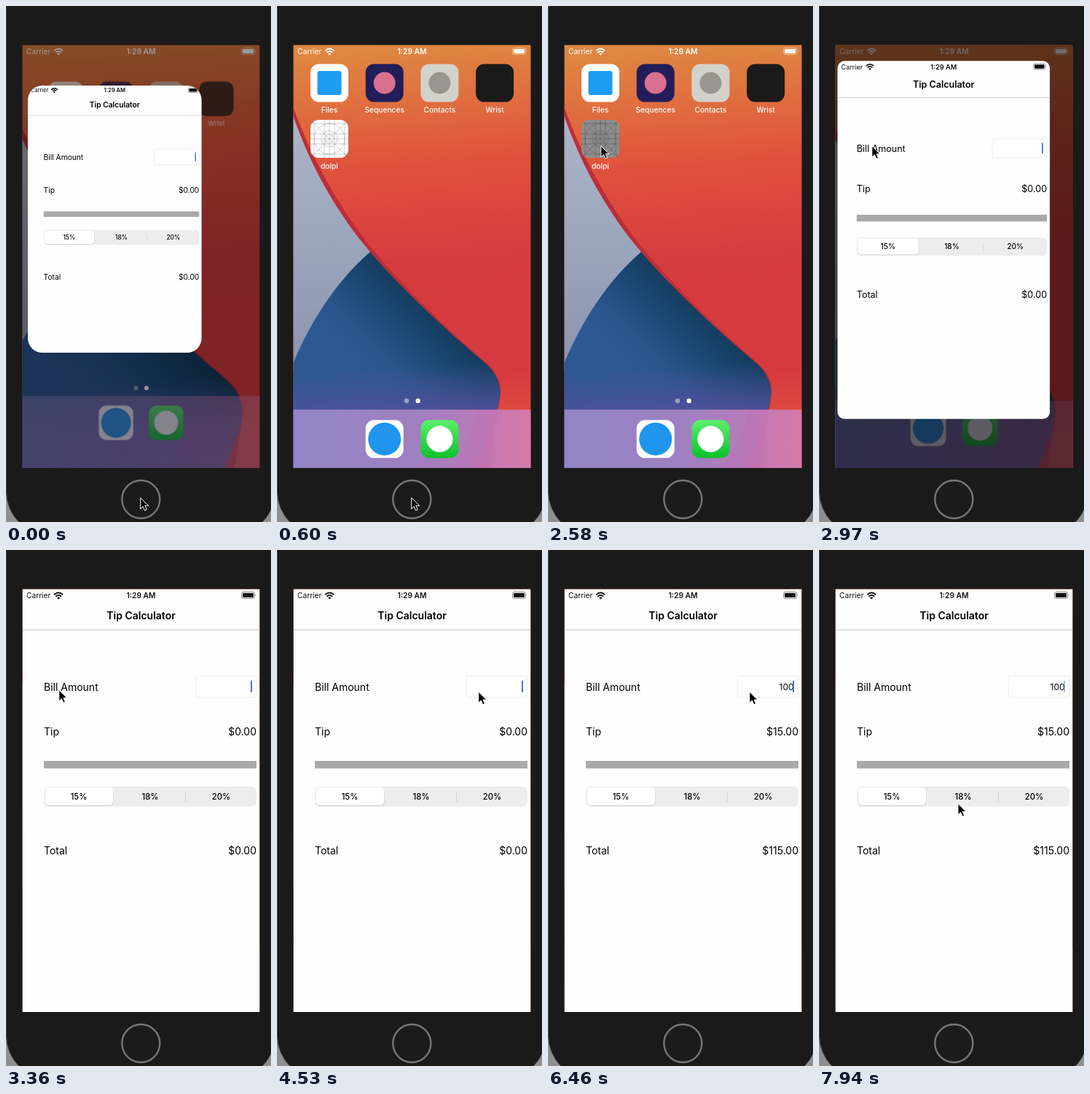
An HTML page for the animation above (8 s loop, 364 by 707 pixels).

```html
<!DOCTYPE html>
<html lang="en">
<head>
<meta charset="utf-8">
<title>Tip calculator demo</title>
<style>
  html, body { margin: 0; width: 100%; height: 100%; overflow: hidden; background: #8f8f8f; }
  svg { display: block; width: 100vw; height: 100vh; }
  text { font-family: Inter, Roboto, sans-serif; font-size: 14px; }
  .mid { text-anchor: middle; }
  .end { text-anchor: end; }
  .label { font-size: 10.2px; font-weight: 500; fill: #fff; text-anchor: middle; }
  .status { font-size: 10.2px; }
  .time { font-size: 10.3px; font-weight: 600; text-anchor: middle; }
  .segment { font-size: 11.3px; font-weight: 500; text-anchor: middle; }
</style>
</head>
<body>
<svg viewBox="0 0 364 707">
  <defs>
    <clipPath id="screenClip"><rect x="22.5" y="53.5" width="326" height="579.5"/></clipPath>
    <clipPath id="cardClip"><rect id="cardShape" x="22.5" y="53.5" width="326" height="579.5"/></clipPath>
    <linearGradient id="red" gradientUnits="userSpaceOnUse" x1="165" y1="53" x2="200" y2="560">
      <stop offset="0" stop-color="#de8842"/><stop offset=".14" stop-color="#e0713f"/>
      <stop offset=".32" stop-color="#e0523c"/><stop offset=".58" stop-color="#d63b40"/>
      <stop offset=".9" stop-color="#d63a40"/><stop offset="1" stop-color="#dc493e"/>
    </linearGradient>
    <linearGradient id="mist" x2="0" y2="1">
      <stop offset="0" stop-color="#abb6c8"/><stop offset="1" stop-color="#8b94b0"/>
    </linearGradient>
    <linearGradient id="blue" gradientUnits="userSpaceOnUse" x1="225" y1="425" x2="130" y2="520">
      <stop offset="0" stop-color="#143b5b"/><stop offset=".35" stop-color="#1a4874"/>
      <stop offset=".7" stop-color="#2a548c"/><stop offset="1" stop-color="#2e5891"/>
    </linearGradient>
    <linearGradient id="dusk" gradientUnits="userSpaceOnUse" x1="160" y1="495" x2="164" y2="560">
      <stop offset="0" stop-color="#54509c" stop-opacity="0"/><stop offset="1" stop-color="#54509c" stop-opacity=".85"/>
    </linearGradient>
    <linearGradient id="dockTint">
      <stop offset="0" stop-color="#938bcb"/><stop offset=".5" stop-color="#a583c4"/>
      <stop offset=".8" stop-color="#c97db8"/><stop offset="1" stop-color="#e57ca6"/>
    </linearGradient>
    <linearGradient id="green" x2="0" y2="1">
      <stop offset="0" stop-color="#5df06c"/><stop offset="1" stop-color="#0cc02c"/>
    </linearGradient>
    <path id="wave" d="M22 490C45 434 82 376 128 337C173 390 240 451 288 491Q306 508 306.500 530Q306 546 298 562L270 640H22Z"/>
    <g id="statusBar">
      <text class="status" x="28" y="66">Carrier</text>
      <path d="M66.2 61.2Q72.2 55.8 78.2 61.2M68.3 63.7Q72.2 60.2 76.1 63.7" fill="none" stroke="currentColor" stroke-width="1.9"/>
      <path d="M70 65.4Q72.2 63.6 74.4 65.4L72.2 67.6Z"/>
      <text class="time" x="185.5" y="66">1:29 AM</text>
      <rect x="323.5" y="57.5" width="18" height="9" rx="2.4" fill="none" stroke="currentColor" stroke-width=".8" opacity=".6"/>
      <rect x="325" y="59" width="15" height="6" rx="1.2"/>
      <path d="M342.6 60.5q1.4 1.5 0 3z" opacity=".6"/>
    </g>
  </defs>

  <rect x=".5" y="-99.5" width="369" height="824.5" rx="60" fill="#1a1a1a" stroke="#3c3c3c"/>
  <circle cx="185.3" cy="676" r="26" fill="#1b1b1b" stroke="#767676" stroke-width="2.4"/>

  <g clip-path="url(#screenClip)">
    <g id="wallpaper">
      <rect x="22" y="53" width="328" height="581" fill="url(#red)"/>
      <path fill="#bd2d38" d="M22 138C48 210 88 281 131 333C178 390 242 450 290 491Q308 508 307.500 530L290 640H22Z"/>
      <path fill="url(#mist)" d="M22 150C46 220 84 286 128 337V500H22Z"/>
      <use href="#wave" fill="url(#blue)"/>
      <use href="#wave" fill="url(#dusk)"/>
    </g>
    <g id="springboard">
      <g id="dock">
        <rect x="-20" y="553" width="410" height="130" fill="url(#dockTint)"/>
        <path d="M232 640Q262 606 276 553H305Q290 604 300 640Z" fill="#c46cb5" opacity=".25"/>
      </g>
      <g id="icons"></g>
      <circle cx="178" cy="541" r="3.2" fill="#fff" opacity=".45"/>
      <circle cx="193.7" cy="541" r="3.2" fill="#fff"/>
    </g>
    <use href="#statusBar" fill="#fff" color="#fff"/>
    <rect id="dim" x="22" y="53" width="328" height="581"/>

    <g id="card"><g clip-path="url(#cardClip)">
      <rect x="22" y="53" width="328" height="581" fill="#fefefe"/>
      <path d="M22 109.5H350" stroke="#c9c9c9"/>
      <use href="#statusBar" fill="#111" color="#111"/>
      <text class="mid" x="185.5" y="95" font-weight="600">Tip Calculator</text>
      <text x="52" y="193">Bill Amount</text>
      <rect x="260.2" y="172.5" width="83.5" height="29.5" rx="4" fill="#fff" stroke="#e9e9e9" stroke-width=".9"/>
      <text id="bill" class="end" x="337.6" y="192" style="font-size:12px"></text>
      <rect id="caret" x="336.2" y="179" width="1.8" height="16" fill="#3f62d8"/>
      <text x="52" y="254">Tip</text>
      <text id="tip" class="end" x="344" y="254"></text>
      <rect x="52" y="289" width="292" height="10.3" fill="#a9a9a9"/>
      <rect x="52" y="324" width="292" height="27.5" rx="6.5" fill="#ededee"/>
      <rect x="53.5" y="326" width="94" height="25" rx="5.5" fill="#d2d2d2"/>
      <rect x="53.5" y="325.2" width="93.5" height="24.6" rx="5.5" fill="#fff"/>
      <path d="M246.5 331V345" stroke="#d4d4d6"/>
      <text class="segment" x="100" y="342" font-weight="600">15%</text>
      <text class="segment" x="198" y="342">18%</text>
      <text class="segment" x="295.5" y="342">20%</text>
      <text x="52" y="417">Total</text>
      <text id="total" class="end" x="344" y="417"></text>
    </g></g>
  </g>
  <path id="cursor" d="M0 0V15.2L3.5 11.900L6 17.500L8.600 16.300L6.200 10.900H11Z" fill="#000" stroke="#fff"/>
</svg>
<script>
const $ = id => document.getElementById(id);
const LOOP = 8000;
const STEP = 147;
const CARD_CLOSED = 600;
const ICON_PRESSED = 2580;
const CARD_OPENING = 2970;
const KEY_PRESSES = [5430, 6320, 6460];

// Home screen icons: a tile with one plain shape on it.
const tile = (column, y, fill, shape = '', name = '') =>
  `<g transform="translate(${46 + 75.7 * column} ${y})"><rect width="52" height="52" rx="11.5" fill="${fill}"/>
   ${shape}<text class="label" x="26" y="66.5">${name}</text></g>`;
const disc = (r, fill) => `<circle cx="26" cy="26" r="${r}" fill="${fill}"/>`;
const square = (size, fill) =>
  `<rect x="${26 - size / 2}" y="${26 - size / 2}" width="${size}" height="${size}" rx="3" fill="${fill}"/>`;
const guides = `<g fill="none" stroke="#aaa" stroke-width=".6">
  ${[6, 11, 21].map(r => `<circle cx="26" cy="26" r="${r}"/>`).join('')}
  ${[5, 19, 26, 33, 47].map(p => `<path d="M${p} 0V52M0 ${p}H52"/>`).join('')}
  <path d="M3 3L49 49M49 3L3 49"/></g>
  <rect id="press" width="52" height="52" rx="11.5" opacity=".45"/>`;

$('icons').innerHTML =
  tile(0, 79.5, '#fff', square(33, '#1c9cf2'), 'Files') +
  tile(1, 79.5, '#221d58', disc(15, '#d9708f'), 'Sequences') +
  tile(2, 79.5, '#d3d2ca', disc(15, '#98968e'), 'Contacts') +
  tile(3, 79.5, '#1b1a1b', '', 'Wrist') +
  tile(0, 156, '#fff', guides, 'dolpi') +
  tile(1, 567.3, '#fff', disc(22.5, '#1f95ee')) +
  tile(2, 567.3, 'url(#green)', disc(18, '#fff'));

const set = (id, attributes) => {
  for (const key in attributes) $(id).setAttribute(key, attributes[key]);
};
const show = visible => ({ visibility: visible ? 'visible' : 'hidden' });
const zoom = s => `translate(185.7 346) scale(${s}) translate(-185.7 -346)`;
const money = n => '$' + n.toFixed(2);
const mix = (a, b, p) => a + (b - a) * p;
const smooth = p => p * p * (3 - 2 * p);

// Progress from 0 to 1 in equal jumps, the first one at the start time.
const stepped = (t, start, count) =>
  Math.min(count, Math.max(0, Math.floor((t - start) / STEP) + 1)) / count;

const cursorMoves = [
  { start: 780, count: 9, via: [170, 165], to: [72.8, 191.8] },
  { start: 3800, count: 4, via: [150, 212], to: [276.8, 194.3] },
  { start: 7350, count: 5, via: [122, 330], to: [191, 347.5] }
];

function cursorAt(t) {
  let position = [184.7, 673.8];
  for (const { start, count, via, to } of cursorMoves) {
    const p = smooth(stepped(t, start, count));
    position = position.map((from, i) => mix(mix(from, via[i], p), mix(via[i], to[i], p), p));
  }
  return position;
}

function drawScene(t) {
  const home = t >= CARD_CLOSED && t < CARD_OPENING;
  const open = 1 - (1 - stepped(t, CARD_OPENING, 3)) ** 2.3;
  set('card', {
    transform: `translate(${mix(30, 22.5, open)} ${mix(109, 53.5, open)})
      scale(${mix(.732, 1, open)}) translate(-22.5 -53.5)`,
    ...show(!home)
  });
  set('cardShape', { height: mix(500, 579.5, open), rx: mix(27, 0, open) });
  set('wallpaper', { transform: zoom(home ? 1 : 1.15) });
  set('springboard', { transform: zoom(home ? 1 : mix(.91, .96, open)) });
  set('dock', { opacity: home ? .94 : .5 });
  set('icons', { opacity: home ? 1 : .75 });
  set('dim', { opacity: home ? 0 : mix(.4, .7, open) });
  set('press', show(home && t >= ICON_PRESSED));
}

function drawBill(t) {
  const pressed = KEY_PRESSES.filter(time => time <= t);
  const bill = '100'.slice(0, pressed.length);
  $('bill').textContent = bill;
  $('tip').textContent = money(bill * .15);
  $('total').textContent = money(bill * 1.15);

  // The caret blinks from the last key press on.
  const blink = pressed.length ? (t - pressed.at(-1)) % 890 : 0;
  set('caret', { opacity: blink < 560 ? 1 : blink < 700 ? .5 : 0 });
}

const start = performance.now();
function frame() {
  const t = (performance.now() - start) % LOOP;
  drawScene(t);
  drawBill(t);
  set('cursor', { transform: `translate(${cursorAt(t)})` });
  requestAnimationFrame(frame);
}
frame();
</script>
</body>
</html>
```
